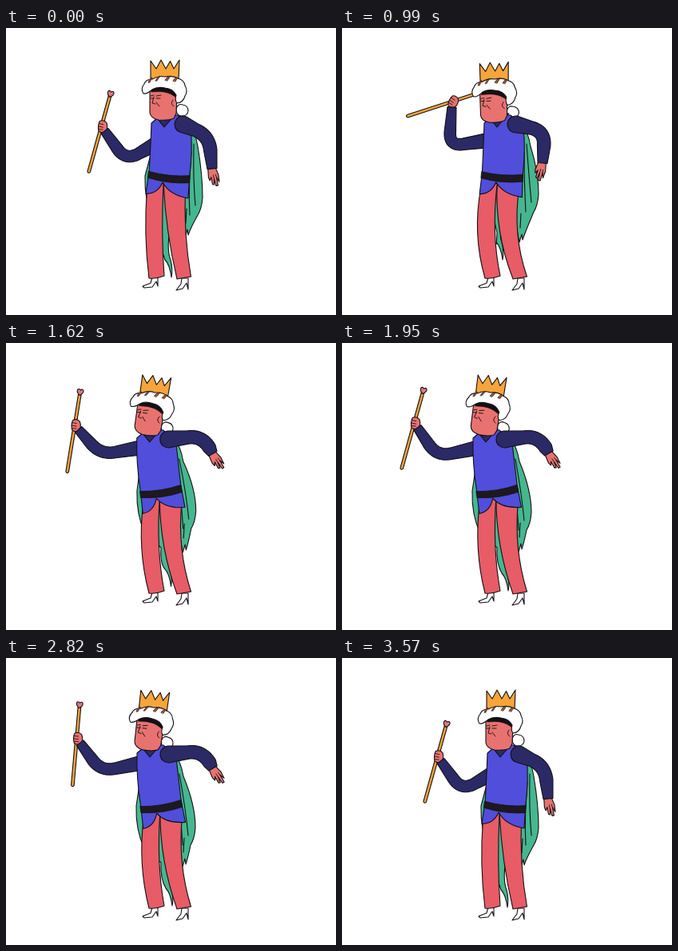
An HTML page with a canvas that plays this animation: 413 by 359 pixels, repeating every 3.9 s.

```html
<!DOCTYPE html>
<html lang="en">
<head>
<meta charset="utf-8">
<title>King with a staff</title>
<style>
html, body { margin: 0; width: 100%; height: 100%; overflow: hidden; background: #fff; }
canvas { display: block; width: 413px; height: 359px; }
</style>
</head>
<body>
<canvas id="stage" width="413" height="359"></canvas>
<script>
const ctx = document.getElementById('stage').getContext('2d');
const LOOP = 3900, STEP = 30, RAD = Math.PI / 180;
const INK = '#141014', SKIN = '#e8726f', PANTS = '#e75c66', BLUE = '#504edb',
  NAVY = '#2b2a66', GREEN = '#45b78f', GOLD = '#f5a53a', WHITE = '#fff';

// head and belt: x, y, angle. staff and palm: angle. cape: left x, bulge, hem, tail.
const stand = {
  head: [199, 62, 0], chest: [198], belt: [204, 186.5, 7], knee: [0],
  shoulder: [186, 146], elbow: [150, 166], grip: [119.5, 123], staff: [15.6],
  elbowR: [254, 135], wristR: [258, 176], palm: [-13],
  cape: [174, 246, 212, 224, 262, 207, 312]
};
const windUp = {
  head: [191, 65, -2], chest: [194], belt: [200.5, 186, 5], knee: [-9],
  shoulder: [180, 141], elbow: [134, 148], grip: [138, 92], staff: [72],
  elbowR: [254, 129], wristR: [251, 169], palm: [14],
  cape: [180, 246, 208, 222, 268, 201, 290]
};
const thrust = {
  head: [187, 63, 10], chest: [179], belt: [193, 186, -7], knee: [-10],
  shoulder: [166, 129], elbow: [118, 133], grip: [72.5, 112], staff: [-10.5],
  elbowR: [245, 116], wristR: [258, 140], palm: [-31],
  cape: [167, 240, 205, 222, 265, 202, 287]
};
const lean = {
  head: [185.5, 63, 7], chest: [180], belt: [194.5, 186, -8], knee: [-7],
  shoulder: [166, 132], elbow: [119, 142], grip: [90.5, 100], staff: [15.6],
  elbowR: [246, 116], wristR: [259, 138], palm: [-33],
  cape: [163, 237, 212, 221, 261, 208, 310]
};
const pullBack = {
  head: [189, 63, 0], chest: [189], belt: [197.5, 186, 3], knee: [-6],
  shoulder: [176, 140], elbow: [124, 147], grip: [125, 90], staff: [77],
  elbowR: [253, 130], wristR: [251, 164], palm: [5],
  cape: [178, 244, 208, 221, 266, 202, 288]
};

const mix = (a, b, u, extra) => {
  const out = {};
  for (const k in a) out[k] = a[k].map((v, i) => v + (b[k][i] - v) * u);
  return { ...out, ...extra };
};

const rest = { ...lean, staff: [16.2] };
const keys = [
  [0, stand], [540, stand], [990, windUp],
  [1080, mix(windUp, thrust, .3, { grip: [112, 92], elbow: [114, 146], staff: [78] })],
  [1320, thrust], [1650, mix(thrust, lean, .8)], [1950, lean], [2250, rest], [2460, rest],
  [2820, { ...lean, head: [184.5, 63, 6], grip: [88.5, 100.5], staff: [5] }],
  [2970, mix(lean, thrust, .6, { staff: [-3] })],
  [3090, mix(thrust, pullBack, .55, { grip: [104, 97], staff: [58] })],
  [3210, pullBack], [3570, stand], [LOOP, stand]
];

// Smooth slope through key n, flat at every turning point.
function slope(n, k, i) {
  if (n < 1 || n > keys.length - 2) return 0;
  const [p, q, r] = [n - 1, n, n + 1].map(j => [keys[j][0], keys[j][1][k][i]]);
  const a = (q[1] - p[1]) / (q[0] - p[0]), b = (r[1] - q[1]) / (r[0] - q[0]);
  return a * b > 0 ? 2 * a * b / (a + b) : 0;
}

function poseAt(t) {
  let n = 0;
  while (n < keys.length - 2 && t >= keys[n + 1][0]) n++;
  const [t0, a] = keys[n], [t1, b] = keys[n + 1];
  const d = t1 - t0, u = (t - t0) / d, v = 1 - u, out = {};
  for (const k in a) out[k] = a[k].map((x, i) =>
    x * v * v * (1 + 2 * u) + b[k][i] * u * u * (3 - 2 * u) +
    d * u * v * (v * slope(n, k, i) - u * slope(n + 1, k, i)));
  return out;
}

function shape(d, fill, width = 1.1) {
  const p = new Path2D(d);
  if (fill) { ctx.fillStyle = fill; ctx.fill(p); }
  if (width) { ctx.strokeStyle = INK; ctx.lineWidth = width; ctx.stroke(p); }
}

function at(x, y, angle, draw) {
  ctx.save();
  ctx.translate(x, y);
  ctx.rotate(angle * RAD);
  draw();
  ctx.restore();
}

const toward = (a, b, dist) => {
  const len = Math.hypot(b[0] - a[0], b[1] - a[1]);
  const u = Math.min(dist / len, .8);
  return [a[0] + (b[0] - a[0]) * u, a[1] + (b[1] - a[1]) * u];
};

// Tapered sleeve: straight, a round bend at e, straight again.
function sleeve(p, e, q, w0, w1) {
  const left = [], right = [], N = 12;
  const add = ([x, y], dx, dy, w) => {
    const r = w / 2 / Math.hypot(dx, dy);
    left.push([x - dy * r, y + dx * r]);
    right.unshift([x + dy * r, y - dx * r]);
  };
  const a = toward(e, p, 18), b = toward(e, q, 18);
  add(p, e[0] - p[0], e[1] - p[1], w0);
  for (let n = 0; n <= N; n++) {
    const u = n / N, v = 1 - u;
    const pos = i => v * v * a[i] + 2 * u * v * e[i] + u * u * b[i];
    const vel = i => v * (e[i] - a[i]) + u * (b[i] - e[i]);
    add([pos(0), pos(1)], vel(0), vel(1), (w0 + w1) / 2);
  }
  add(q, q[0] - e[0], q[1] - e[1], w1);
  const r = w0 / 2;
  shape(`M${left.join('L')}L${right.join('L')}A${r} ${r} 0 0 0 ${left[0]}Z`, NAVY);
}

function cape(c, [left, rx, ry, hx, hy, tx, ty]) {
  shape(`M${c + 12} 112Q${c + 36} 112 ${c + 42} 148Q${rx} ${ry - 28} ${rx} ${ry}
    Q${rx - 1} ${ry + 14} ${rx - 6} ${ry + 22}Q${hx + 7} ${hy - 12} ${hx + 4} ${hy - 3}
    L${hx + 3} ${hy - 10}L${hx} ${hy}L${hx - 4} ${hy - 20}L205 252
    Q${tx - 6} ${ty - 34} ${tx - 1} ${ty - 22}Q${tx + 2} ${ty - 10} ${tx} ${ty}
    Q${tx - 2} ${ty - 16} ${tx - 8} ${ty - 22}Q193 276 194 256
    L${left + 10} 238Q${left - 1} 215 ${left} 185L${c - 8} 125Z`, GREEN);
  shape(`M${c + 37} 145Q${rx - 12} ${ry - 22} ${rx - 9} ${ry + 10}
    M${c + 34} 155Q${rx - 18} ${ry - 12} ${rx - 16} ${ry + 22}
    M${hx + 2} ${hy - 36}L${hx + 1} ${hy - 18}`);
}

function legs([bx, , angle], k) {
  const hip = bx - 20 * Math.sin(angle * RAD);
  shape('M220 313L219 320L213 328L221 326L226 319L228 327L228 313Z', WHITE);
  shape(`M${hip - 4.5} 194Q${200 + k} 255 214 314L231.5 311Q${222 + k} 258 ${hip + 23} 200Z`, PANTS);
  shape('M183 312L181 319L171 323L173 325L183 324L188 317L190 323L190 312Z', WHITE);
  shape(`M${hip - 25} 200Q${172 + k} 258 179 313Q188 314 198 310
    Q${194 + k * .8} 258 ${hip - 4.5} 194Z`, PANTS);
}

function staff() {
  shape('M-1.8 -40L-1.8 59Q0 62 1.8 59L1.8 -40Z', GOLD);
  shape('M0 -38C-7 -43 -3 -48 0 -44.5C3 -48 7 -43 0 -38Z', '#e27880');
}

function fist() {
  shape('M-4 -6Q1 -9 5 -5Q8 2 4 7Q-1 9 -4 6Q-6 0 -4 -6Z', SKIN);
  shape('M-4.5 -3L1 -2.5M-5 .5L1 1M-4.5 4L1 4', null, .8);
}

function openHand() {
  shape('M-5 -2L4 -2L6 9L5 18L3 12L2.5 22L0 22L-.5 13L-2 20L-4 19L-3.5 10L-6 14L-7 10Z', SKIN);
  shape('M2.5 8L3 13M-.5 8L-.5 14', null, .8);
}

function torso(c, [bx, by, angle]) {
  const cos = Math.cos(angle * RAD), sin = Math.sin(angle * RAD);
  const rel = (x, y) => `${bx + x * cos - y * sin} ${by + x * sin + y * cos} `;
  shape(`M${c - 9} 111L${c} 125L${c + 15} 107Z`, NAVY);
  shape(`M${c - 9} 113L${c - 16} 119Q${c - 17} 150 ${rel(-25.5, -4)}L${rel(-26.3, 24)}
    Q${rel(-12, 23)}${rel(-7, 7.4)}Q${rel(3, 22)}${rel(27, 23.4)}L${rel(25.5, -4)}
    Q${c + 36} 150 ${c + 33} 125L${c + 17} 109L${c + 13} 109L${c} 124Z`, BLUE);
  shape(`M${rel(-26, -4)}Q${rel(0, 0)}${rel(25.5, -5)}L${rel(26, 4)}
    Q${rel(0, 9)}${rel(-26, 4)}Z`, '#1d191f', .8);
}

function head() {
  shape('M-19 15L-19 44Q-18 51 -8 53Q4 54 11 51L14 45L15 20Z', SKIN);
  shape('M-17 11L10 10L16 26L11 23Q4 18 -6 17.5L-17 18Z', INK, .5);
  shape(`M-18 23L-14 22M-18 26L-14 26M-11 23L-5 22M-11 26L-6 26
    M-14 24L-16 32L-12 33M-11 31L-7 36M10 28Q6 33 11 36`, null, .9);
  shape('M-18 1L-18 -21L-11 -11L-5 -22L1 -11L6.5 -20.5L11 -11L18 -22L17 4L-18 5Z', GOLD);
  shape(`M-27 20Q-31 14 -26 8Q-24 2 -16 2Q-8 -3 0 -1Q10 -3 16 1Q24 3 25 10
    Q29 17 25 23Q23 31 15 32Q12 28 14 22Q10 14 0 13Q-10 11 -16 15Q-23 21 -27 20Z`, WHITE);
  shape(`M-21 6Q-20 1 -16 0L-19 6ZM-12 4Q-10 -1 -6 -2L-10 4Z
    M0 3Q3 -2 7 -2L3 4ZM10 4Q13 -1 16 0L13 5Z`, '#a5512f', .6);
}

function draw(t) {
  const p = poseAt(t), c = p.chest[0];
  ctx.fillStyle = WHITE;
  ctx.fillRect(0, 0, 413, 359);
  ctx.lineJoin = ctx.lineCap = 'round';

  cape(c, p.cape);
  at(...p.head, () => shape('M14 39Q16 32 22 34Q29 35 29 42Q28 48 21 48Q14 48 14 39Z', WHITE));
  legs(p.belt, p.knee[0]);

  const [gx, gy] = p.grip;
  at(gx, gy, p.staff[0], staff);
  at(gx + 1, gy, p.staff[0] * .4, fist);
  sleeve(p.shoulder, p.elbow, toward(p.grip, p.elbow, 7), 18, 11);

  torso(c, p.belt);
  at(...p.wristR, p.palm[0], openHand);
  sleeve([c + 23.5, 120.5], p.elbowR, p.wristR, 21, 12);
  at(...p.head, head);
}

const start = performance.now();
function tick() {
  const t = (performance.now() - start) % LOOP;
  draw(Math.floor(t / STEP) * STEP);
  requestAnimationFrame(tick);
}
tick();
</script>
</body>
</html>
```
